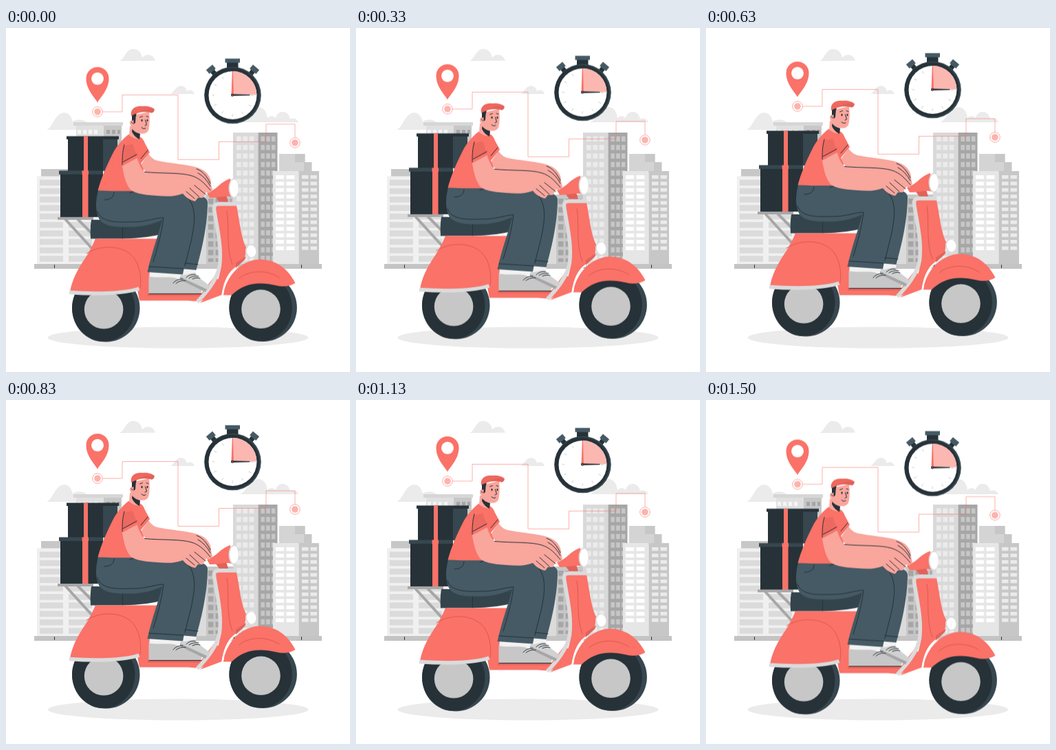
Recreate the animation shown at these times as an HTML page. Size 500 px wide and 500 px high, loop 1540 ms.

```html
<!DOCTYPE html>
<html lang="en">
<head>
<meta charset="utf-8">
<title>Scooter delivery</title>
<style>
  html, body { margin: 0; width: 100%; height: 100%; overflow: hidden; background: #fff; }
  svg { display: block; width: 100%; height: 100%; }
  .float { animation: float 1540ms linear -45ms infinite; }
  @keyframes float {
    0%, 100% { transform: translateY(.55px); }
    50% { transform: translateY(-9.45px); }
  }
  .coral { fill: #fa7268; }
  .deep { fill: #e0625a; }
  .skin { fill: #f9a69d; }
  .dark { fill: #263238; }
  .slate { fill: #37474f; }
  .denim { fill: #455a64; }
  .cloud { fill: #ebebeb; }
  .grey { fill: #c7c7c7; }
  .ink, .seam, .trim, .rack, .route { fill: none; stroke-linecap: round; stroke-linejoin: round; }
  .ink { stroke: #263238; stroke-width: 1; }
  .seam { stroke: #d9584f; stroke-width: .9; }
  .trim { stroke: #dbdbdb; stroke-width: 5.5; stroke-linecap: butt; }
  .rack { stroke: #a6a6a6; stroke-width: 4; stroke-linecap: butt; }
  .route { stroke: #fa7268; stroke-width: 1; opacity: .55; }
</style>
</head>
<body>
<svg viewBox="0 0 500 500" xmlns="http://www.w3.org/2000/svg">
  <defs>
    <pattern id="bands" patternUnits="userSpaceOnUse" x="49" y="220.5" width="42" height="12.3">
      <rect width="34" height="8.5" fill="#dbdbdb"/>
    </pattern>
    <pattern id="paneA" patternUnits="userSpaceOnUse" x="335" y="157.5" width="9.3" height="12.4">
      <rect width="6.8" height="7.5" fill="#ebebeb"/>
    </pattern>
    <pattern id="paneB" patternUnits="userSpaceOnUse" x="370.5" y="157.5" width="7.7" height="12.4">
      <rect width="5.5" height="7.5" fill="#c7c7c7"/>
    </pattern>
    <pattern id="paneC" patternUnits="userSpaceOnUse" x="392" y="214" width="15.5" height="9.4">
      <rect width="12" height="5.5" fill="#fff"/>
    </pattern>
    <pattern id="paneD" patternUnits="userSpaceOnUse" x="430" y="214" width="12.5" height="9.4">
      <rect width="9.5" height="5.2" fill="#ebebeb"/>
    </pattern>
    <pattern id="paneE" patternUnits="userSpaceOnUse" x="294" y="248" width="10.5" height="12.4">
      <rect width="7.5" height="8" fill="#a6a6a6"/>
    </pattern>
    <g id="wheel">
      <circle r="49.2" class="slate"/>
      <ellipse cx="-3.6" rx="45.7" ry="48.8" class="dark"/>
      <circle cx="-3.2" cy="2" r="28.3" class="grey"/>
    </g>
    <g id="stop">
      <circle r="7.3" fill="#fff" stroke="#fbaaa4" stroke-width="1"/>
      <circle r="4.8" fill="#fcb3ad"/>
    </g>
    <g id="knob">
      <rect x="-3.5" y="-46" width="7" height="9" class="dark"/>
      <rect x="-6" y="-53" width="12" height="7.5" class="denim"/>
    </g>
  </defs>

  <!-- sky -->
  <g class="cloud">
    <path d="M165 48C172 46 174 31 184 30.500C193 30.500 197 37 198 43C202 38 213 36 217 47.500Z"/>
    <path d="M239 96C244 94 247 84 254 84C260 84 262 88 263 92C267 88 273 91 274 96Z"/>
    <path d="M59 148C68 145 71 124 84 123C92 123 95 129 97 136C103 131 116 133 119 139V148Z"/>
    <path d="M340 137C350 134 354 115 367 115C375 115 379 122 380 131C384 126 390 128 392 131C394 119 410 118 413 132C419 130 423 132 425 137Z"/>
  </g>

  <!-- city -->
  <ellipse cx="250" cy="450" rx="189.500" ry="15.500" class="cloud"/>
  <path class="grey" d="M51 205H90V216H51Z"/>
  <path fill="#f0f0f0" d="M45 215.500H133V343H45Z"/>
  <path fill="#e0e0e0" d="M102 141H142V205H102Z"/>
  <path fill="url(#bands)" d="M49 220H125V341H49Z"/>
  <path class="grey" d="M142 141H168V240H142Z"/>
  <path fill="#d6d6d6" d="M98 137H170V142H98Z"/>
  <path fill="#f5f5f5" d="M104 148h5v6h-5zm8 0h5v6h-5zm8 0h5v6h-5zm8 0h5v6h-5z"/>
  <path fill="#a6a6a6" d="M146 148h5v6h-5zm8 0h5v6h-5zm8 0h4v6h-4z"/>
  <path fill="#dbdbdb" d="M270 242H291V343H270Z"/>
  <path class="grey" d="M291 242H331V343H291Z"/>
  <path fill="url(#paneE)" d="M294 248H328V340H294Z"/>
  <path fill="#d9d9d9" d="M330 152H366.500V343H330Z"/>
  <path fill="url(#paneA)" d="M335 157H361V340H335Z"/>
  <path fill="#a6a6a6" d="M366.500 152H394.500V343H366.500Z"/>
  <path fill="url(#paneB)" d="M370 157H392V340H370Z"/>
  <path fill="#d4d4d4" d="M397 183H434.500V210H397Z"/>
  <path fill="#c7c7c7" d="M420 183H434.500V195H444.500V210H433V195H420Z"/>
  <path fill="#e6e6e6" d="M388 208H425.500V343H388Z"/>
  <path fill="url(#paneC)" d="M392 214H420V324H392Z"/>
  <path fill="#c7c7c7" d="M425.500 208H455V343H425.500Z"/>
  <path fill="url(#paneD)" d="M430 214H453V324H430Z"/>
  <path fill="#c4c4c4" d="M41 343H459V350H41Z"/>
  <path class="ink" d="M70.500 344.500V348.500M331.500 344.500V348.500M429.500 344.500V348.500"/>

  <g class="float">
    <!-- route -->
    <path class="route" d="M140 122H169V97.500H250V191.500H309.500V165.500H378V140H420V160"/>
    <use href="#stop" x="133" y="122"/>
    <use href="#stop" x="420" y="167"/>
    <path class="coral" d="M133 108.500C129 101 116.500 90 116.500 73.500A16.500 16.500 0 0 1 149.500 73.500C149.500 90 137 101 133 108.500Z"/>
    <circle cx="133" cy="73.800" r="9" fill="#fff"/>

    <!-- stopwatch -->
    <g transform="translate(329.500 98)">
      <use href="#knob" transform="rotate(-40)"/>
      <use href="#knob" transform="rotate(40)"/>
      <path class="dark" d="M-8.500 -48H8V-38H-8.500Z"/>
      <path class="denim" d="M-11 -53.300H10.500V-47.300H-11Z"/>
      <circle r="41.300" class="slate"/>
      <circle cx="-1" r="39.800" class="dark"/>
      <circle r="35" fill="#fff"/>
      <path fill="#fcb7b1" d="M-.5 -.5V-34.900A34.900 34.900 0 0 1 34.900 -.5Z"/>
      <circle r="29" fill="none" stroke="#c7c7c7" stroke-width="4" stroke-dasharray="1.600 28.400" pathLength="360"/>
      <path class="coral" d="M-2 0L-.7 -35H.4L1.500 0Z"/>
      <path class="dark" d="M-2 -1.700L25 -1.100V.2L-2 1Z"/>
      <circle cx="-.5" cy="-.2" r="2" class="dark"/>
      <circle cx="-.5" cy="-.2" r=".8" class="coral"/>
    </g>

    <!-- scooter -->
    <use href="#wheel" x="145.300" y="407.300"/>
    <use href="#wheel" x="373.700" y="406.800"/>
    <path class="rack" d="M86 278L128 324M104 278L132 306"/>
    <path fill="#a6a6a6" d="M75 275H127V279H75Z"/>
    <path class="dark" d="M79 212H141V275H79ZM90 161H162V208H90Z"/>
    <path class="slate" d="M77 207.500H141V213H77ZM141 162H162V208H141Z"/>
    <path class="dark" d="M88 157.500H164V162H88Z"/>
    <path class="coral" d="M113 157.500H119V207.500H113ZM110.500 207.500H120V213H119.500V275H111V213H110.500Z"/>

    <path fill="#34444c" d="M124 279H229V299Q205 306 170 306.500H123Q122 292 124 279Z"/>
    <path class="ink" d="M169.500 288V306"/>
    <path class="coral" d="M93 384C98 355 116 336 122 323Q127 314 130 306.500H236L222 362V386H284L304 360L318 380L282 398L264 396.500H194L191 381Q145 389 93 384Z"/>
    <path class="deep" d="M206 386.500H285L281 389.500H206Z"/>
    <path class="seam" d="M117 328C140 313 175 317 187 336C195 348 197 364 195 378"/>
    <path class="trim" d="M92 384.500C125 387 170 387 193.500 379"/>

    <path class="coral" d="M305 256H334.500C339 275 341 305 349.500 320L347 334L335 347C322 357 317 372 314 388L282 400C301 385 310 368 312 349C313 320 304 285 303 264Z"/>
    <path class="seam" d="M321 267C325 285 319 318 329 344"/>
    <path class="trim" d="M335.500 256H309C301 256 302 262 303.500 270C308 297 313.500 320 310.500 346C307 367 290 386 278 398.500"/>
    <path class="coral" d="M316 388.500C319 361 343 336 371 336.500C397 338 412 354 420.500 371C412 376 402 377 393 374.500C365 368 345 372 328 388.500Z"/>
    <path class="seam" d="M339 364C354 351 381 352 397 363"/>
    <path d="M337 347C323 355 317 370 314.500 389" fill="none" stroke="#fff" stroke-width="2.500"/>
    <path class="deep" d="M334 342L349 332L347 337L334 349Z"/>
    <ellipse cx="356" cy="324.700" rx="8" ry="10" fill="#dbdbdb" transform="rotate(-8 356 325)"/>
    <ellipse cx="356.700" cy="324.700" rx="6.700" ry="8.800" fill="#fff" transform="rotate(-8 356 325)"/>
    <path class="deep" d="M304 245L320 243L323 253H310Z"/>
    <path class="coral" d="M292 240C306 236 312 223 326 219L331 247C320 242 308 248 296 247Z"/>
    <ellipse cx="330.800" cy="233" rx="7.300" ry="14.200" fill="#dbdbdb"/>
    <ellipse cx="331.500" cy="233" rx="6.200" ry="12.800" fill="#fff"/>

    <!-- shoes -->
    <path fill="#f2f2f2" d="M258 348H277L276 358L257 360ZM209 353H257L254 364H208Z"/>
    <path class="grey" d="M207.500 361.500C225 364 238 361 247 364C262 370 277 374 285 381L283 387H207.500Z"/>
    <path fill="#d1d1d1" d="M254 359C264 360 270 355 276 357C280 365 292 370 296.500 376L292 382L253 364Z"/>
    <path fill="#a6a6a6" d="M253 362L292 380L290 384L253 366Z"/>
    <path class="ink" stroke-width="1.300" d="M243 371C247 366 252 365 257 365M247 371.500C251 368 256 367 261 367.500M262 363C266 359 270 358 275 358.500M266 364C271 360.500 276 360.500 280 361M271 365C275 363 279 363 282 364M208 386.500H284"/>

    <!-- rider -->
    <path class="denim" d="M134 236C131 248 129 262 134 275C139 289 160 290 181 289.500C201 289 216 285 227 279C222 300 213 322 205.500 355L257 358.500L258.500 350.500L276.500 352C283 328 293 290 293 253C292 244 275 241 258 241L205 236Z"/>
    <path class="ink" d="M133 267C139 286 170 282 190 282C207 281 218 276 229 276C226 300 219 324 214 340M264 246C277 262 275 282 269 310L260 346M143 250C153 250 157 245 157 239M180 240C188 236 200 238 208 241M208 347L258 350M260 342L279 344"/>
    <path class="skin" d="M194 202L207 183Q213 193 225 194C247 198 270 199 283 205C292 209 299 218 298 227L300 235L296 240L262 230L200 214Z"/>
    <path class="coral" d="M178 155C168 163 160 173 155 183C146 201 138 219 133.500 236.500C155 237.500 185 237.500 206 237L200 206L196 197L209 181L202 168C200 162 197 159 192 157Z"/>
    <path class="skin" d="M180 143L191 141L194 160Q190 164 179 156Z"/>
    <path class="dark" d="M183.500 147C187 152 192 153 195 154L194 162Q187 159 183 151Z"/>
    <path class="skin" d="M185 127L208 122C209 131 209 140 207.500 147C206 155 196 155 191 152C187 149 186 146 185.500 143C179 145 178 133 184 134Z"/>
    <path class="dark" d="M183 126L190 123Q188 130 188 138L185.500 140V134L183 135Z"/>
    <path fill="#ee685e" d="M182 128C180 118 188 113 198 114C205 113 212 115 215.500 118Q216 122 212 123.500C202 121 192 122 182 128Z"/>
    <path class="deep" d="M194 122Q206 116 215.500 118.500Q216 122 212 123.500Q202 121 194 122Z"/>
    <ellipse cx="197.500" cy="134.500" rx="1.100" ry="1.800" class="dark"/>
    <ellipse cx="205.500" cy="134.500" rx="1" ry="1.800" class="dark"/>
    <path class="ink" d="M194.500 130L198.500 128.500M204 128.500L207 129.500M202.500 134L204.500 141L202 142M197 145Q200 148 203 146M182 137L184.500 139"/>

    <path class="skin" d="M168.500 199L190 188C194 199 197 207 202 209C227 212 254 211 270 217C282 221 291 231 297 237L291 239L286 247L279 247L275 252C268 251 261 246 257 241C244 246 232 245 219 244C203 243 186 241 180 234C173 225 171 212 168.500 199Z"/>
    <path class="coral" d="M175 163C169 174 168 188 168.500 201L191 189L184 170Z"/>
    <path class="deep" d="M171 172L184 169L190 186L169 196Z" opacity=".55"/>
    <path class="ink" d="M172 170C169 181 169 190 169 199M170 195L190 184M196 190L206 178"/>
    <path fill="#fff" d="M200 205.500L203 209.500L200 210Z"/>
    <path class="ink" d="M201 209.500C227 212 254 210 270 215C283 219 290 228 297 236M277 205C286 208 292 216 297 226M279 211Q290 217 297 230M262 238L274 248M267 233L281 246M274 229L290 242"/>
  </g>
</svg>
</body>
</html>
```
